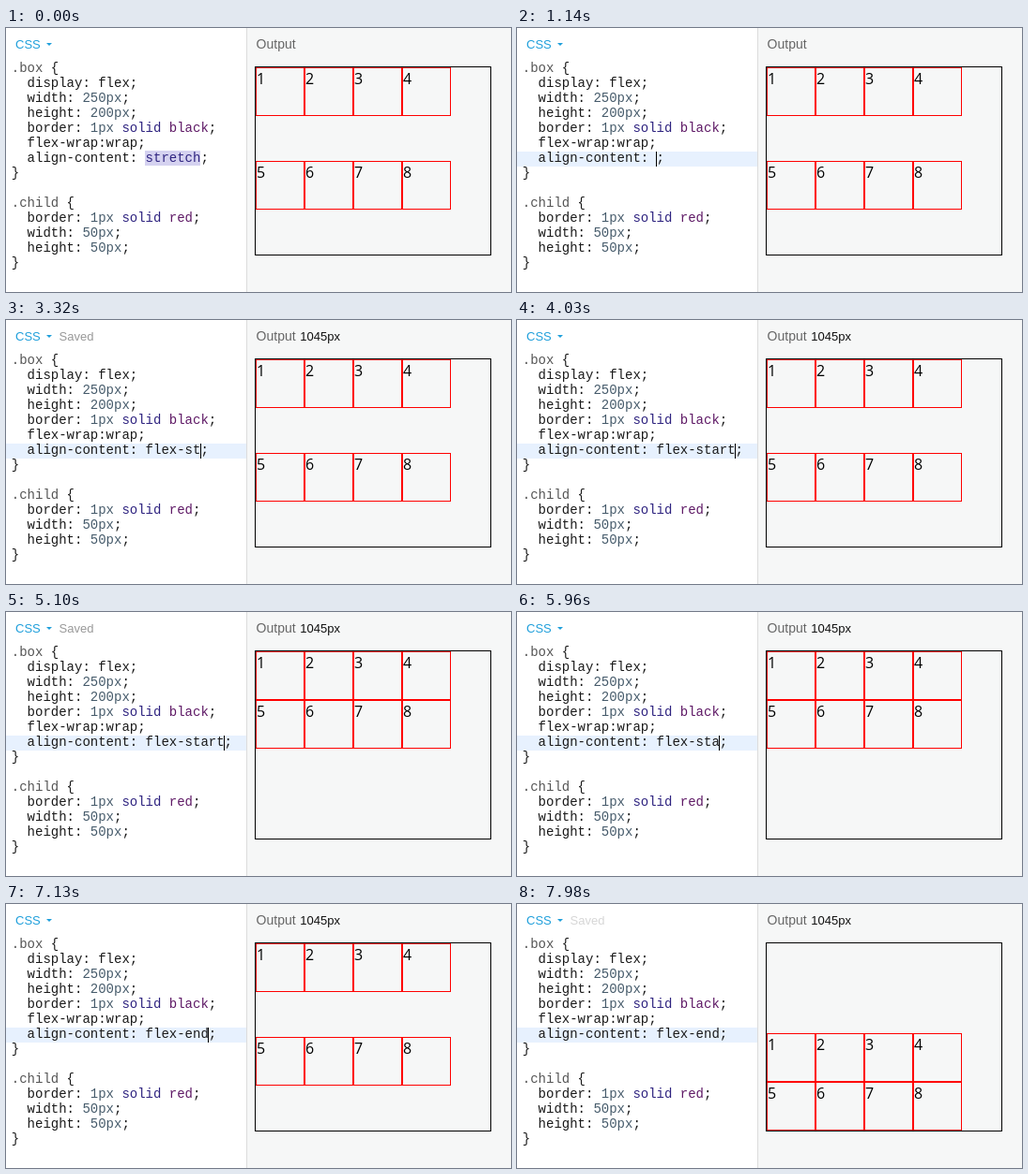
Write an HTML page with a canvas that moves like this. It is 538 px wide and 282 px high and loops after 8000 ms.

```html
<!DOCTYPE html>
<html lang="en">
<head>
<meta charset="utf-8">
<title>align-content demo</title>
<style>
  html, body { margin: 0; width: 100%; height: 100%; overflow: hidden; background: #fff; }
  canvas { display: block; }
</style>
</head>
<body>
<canvas id="stage" width="538" height="282"></canvas>
<script>
const ctx = document.getElementById('stage').getContext('2d', { alpha: false });
const LOOP = 8000;
const MONO = '14px "Liberation Mono", "Noto Sans Mono", monospace';
const SANS = '"Liberation Sans", Arial, sans-serif';
const UI = '13px ' + SANS, TITLE = '14px ' + SANS;
const DIGIT = '16px "Open Sans", "Noto Sans", sans-serif';

const CODE_X = 5.8, CHAR = 8.4, ROW = 16, TOP = 36;
const VALUE_COL = 17, VALUE_ROW = 6;
const INK = '#1a1a1a', SELECTOR = '#555', NUMBER = '#465b6b', ATOM = '#2f2480', KEYWORD = '#5f1a66';

// Each line is a list of [text, colour] runs
const rule = (name, value, color) => [['  ' + name + ': ', INK], [value, color], [';', INK]];
const border = color => [['  border: ', INK], ['1px', NUMBER], [' solid ', ATOM], [color, KEYWORD], [';', INK]];
const lines = [
  [['.box', SELECTOR], [' {', INK]],
  rule('display', 'flex', INK),
  rule('width', '250px', NUMBER),
  rule('height', '200px', NUMBER),
  border('black'),
  [['  flex-wrap:wrap;', INK]],
  [['  align-content: ', INK]],
  [['}', INK]],
  [],
  [['.child', SELECTOR], [' {', INK]],
  border('red'),
  rule('width', '50px', NUMBER),
  rule('height', '50px', NUMBER),
  [['}', INK]]
];

// Step tracks: [time, value]
const typed = [
  [0, 'stretch'], [1140, ''], [1310, 'f'], [1370, 'fl'], [1540, 'fle'], [1770, 'flex'],
  [2390, 'flex-'], [2720, 'flex-s'], [3320, 'flex-st'], [3630, 'flex-sta'],
  [3800, 'flex-star'], [4030, 'flex-start'], [5730, 'flex-star'], [5960, 'flex-sta'],
  [6110, 'flex-st'], [6260, 'flex-s'], [6430, 'flex-'], [6740, 'flex-e'],
  [7060, 'flex-en'], [7130, 'flex-end']
];
const caretOn = [
  [0, false], [1140, true], [2320, false], [2390, true], [3250, false], [3320, true],
  [4560, false], [5100, true], [5650, false], [5730, true], [7680, false]
];
const savedAlpha = [
  [0, 0], [2720, .4], [3250, .8], [3320, 1], [3630, .5], [3800, 0],
  [4870, .4], [4990, .75], [5100, 1], [5650, .5], [5730, 0], [7980, .4]
];
const widthAlpha = [[0, 0], [1310, .5], [1370, 1], [6340, .5], [6510, 0], [6660, .5], [6740, 1]];
const rowTops = [[0, [42, 142]], [4250, [42, 94]], [6660, [42, 142]], [7360, [138, 190]]];

function at(track, t) {
  let value = track[0][1];
  for (const [start, v] of track) if (t >= start) value = v;
  return value;
}

function rect(x, y, w, h, color) {
  ctx.fillStyle = color;
  ctx.fillRect(x, y, w, h);
}

function frame(x, y, w, h, color) {
  ctx.strokeStyle = color;
  ctx.lineWidth = 1;
  ctx.strokeRect(x + .5, y + .5, w - 1, h - 1);
}

function text(str, x, y, font, color, alpha = 1) {
  ctx.globalAlpha = alpha;
  ctx.font = font;
  ctx.fillStyle = color;
  ctx.fillText(str, x, y);
  ctx.globalAlpha = 1;
}

const colX = col => CODE_X + col * CHAR;

function codeRuns(runs, row, col = 0) {
  for (const [str, color] of runs) {
    text(str, colX(col), TOP + row * ROW + 11, MONO, color);
    col += str.length;
  }
}

function drawEditor(t) {
  const value = at(typed, t), selected = t < 1140;
  const y = TOP + VALUE_ROW * ROW;
  const end = VALUE_COL + value.length;
  rect(0, 0, 256, 282, '#fff');
  if (selected) rect(148, y - 1, 59, ROW, '#d5d2f0');
  else rect(0, y, 256, ROW, '#e7f1fe');

  text('CSS', 10, 22, UI, '#1f9fdb');
  ctx.fillStyle = '#1f9fdb';
  ctx.beginPath();
  ctx.moveTo(43, 16);
  ctx.lineTo(49, 16);
  ctx.lineTo(46, 19);
  ctx.fill();
  text('Saved', 56.5, 22, UI, '#999', at(savedAlpha, t));

  lines.forEach((runs, row) => codeRuns(runs, row));
  codeRuns([[value, selected ? ATOM : INK], [';', INK]], VALUE_ROW, VALUE_COL);
  if (at(caretOn, t)) rect(Math.floor(colX(end)), y, 1, ROW, '#000');
}

function drawOutput(t) {
  rect(256, 0, 282, 282, '#f6f7f7');
  rect(256, 0, 1, 282, '#dcdcdc');
  text('Output', 266.6, 22, TITLE, '#666');
  text('1045px', 313.3, 22, UI, '#111', at(widthAlpha, t));

  frame(265, 41, 252, 202, '#000');
  at(rowTops, t).forEach((y, row) => {
    for (let col = 0; col < 4; col++) {
      const x = 266 + col * 52;
      frame(x, y, 52, 52, '#f00');
      text(String(row * 4 + col + 1), x + 1, y + 18, DIGIT, '#000');
    }
  });
}

const start = performance.now();
function draw() {
  const t = (performance.now() - start) % LOOP;
  drawEditor(t);
  drawOutput(t);
  requestAnimationFrame(draw);
}
draw();
</script>
</body>
</html>
```
